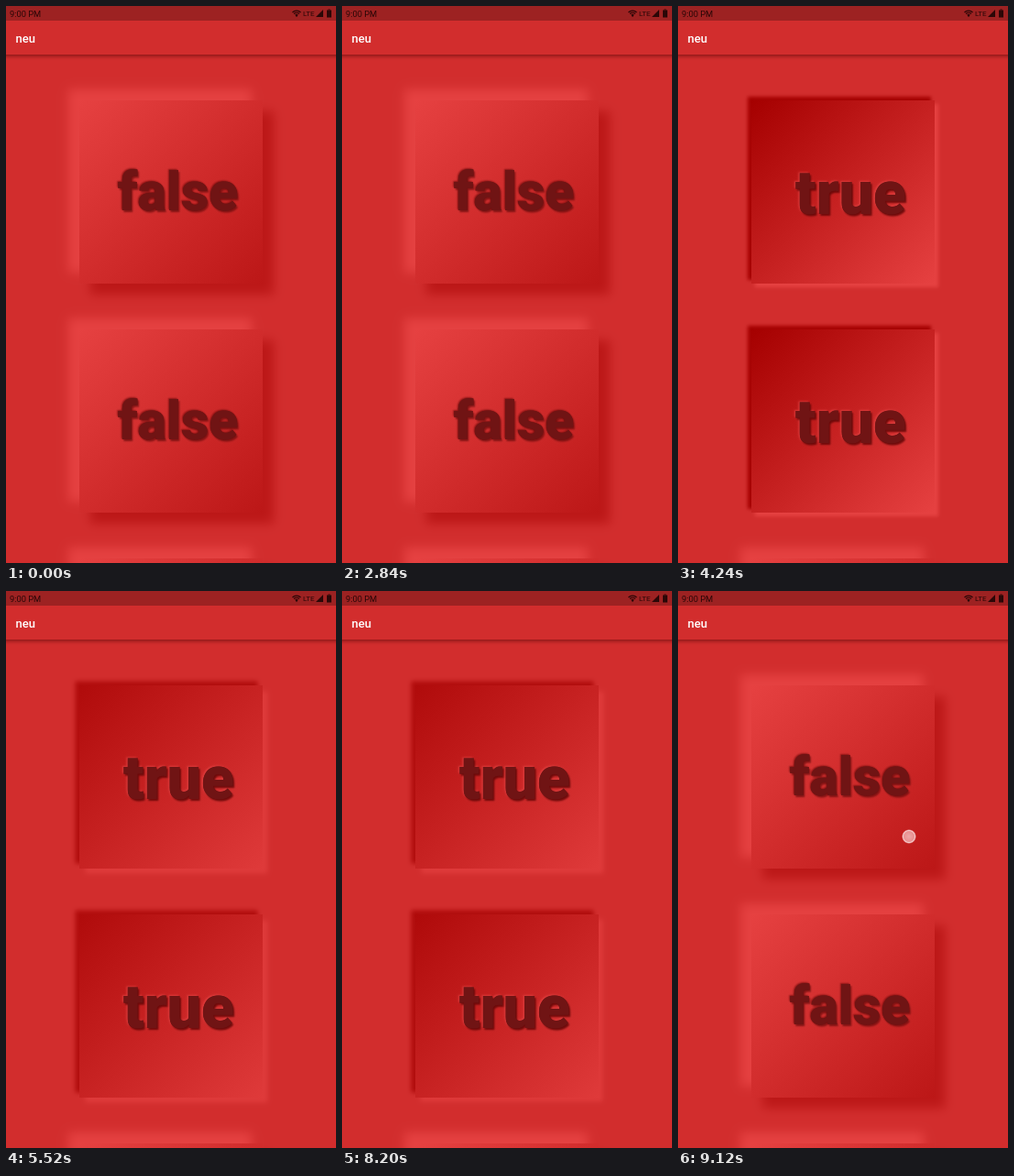
Write an HTML page with a canvas that moves like this. It is 360x608 px and loops after 9.16 s.

```html
<!DOCTYPE html>
<html lang="en">
<head>
<meta charset="utf-8">
<title>neu</title>
<style>
  html, body { margin: 0; width: 100%; height: 100%; overflow: hidden; background: #d22d2d; }
  canvas { display: block; width: 360px; height: 608px; }
</style>
</head>
<body>
<canvas id="stage" width="360" height="608"></canvas>
<script>
const ctx = document.getElementById('stage').getContext('2d');
const LOOP = 9160;
const SETTLE = 1000;
const BASE = [210, 45, 45];
const CARD = { x: 80, size: 200, tops: [103, 353, 603] };

// Moments at which each card flips, starting from "false".
const FLIPS = [
  [560, 1920, 4020, 8400],
  [4020, 6440, 7560, 8400],
  []
];

const TOUCHES = [
  { x: 245, y: 279, from: 80, to: 1920 },
  { x: 228.5, y: 425.5, from: 5960, to: 7560 },
  { x: 252, y: 268, from: 9080, to: LOOP }
];

const lerp = (a, b, t) => a + (b - a) * t;
const shade = d => `rgb(${BASE.map(c => Math.max(0, Math.min(255, Math.round(c + d)))).join()})`;

function elasticOut(t) {
  if (t <= 0) return 0;
  if (t >= 1) return 1;
  return 1 + 2 ** (-10 * t) * Math.sin((t - 0.1) * Math.PI * 5);
}

function cardState(flips, time) {
  const past = flips.filter(f => f <= time);
  const on = past.length % 2 === 1;
  if (!past.length) return { on, press: 0 };
  const e = elasticOut((time - past[past.length - 1]) / SETTLE);
  return { on, press: on ? e : 1 - e };
}

function setShadow(color, blur, offset) {
  ctx.shadowColor = color;
  ctx.shadowBlur = blur;
  ctx.shadowOffsetX = ctx.shadowOffsetY = offset;
}

function text(str, x, y, font, color) {
  ctx.font = font;
  ctx.fillStyle = color;
  ctx.fillText(str, x, y);
}

function drawLabel(on, top) {
  const [str, x, y, size] = on ? ['true', 128, 124, 66] : ['false', 122, 120, 59];
  const font = `900 ${size}px Roboto, sans-serif`;
  ctx.save();
  setShadow(on ? 'rgba(225,65,65,.75)' : 'rgba(120,12,12,.8)', 2, on ? -1.5 : -1);
  text(str, x, top + y, font, '#701414');
  setShadow(on ? 'rgba(95,5,5,.85)' : 'rgba(110,12,12,.8)', 2, 1.5);
  text(str, x, top + y, font, '#701414');
  ctx.restore();
}

function drawCard(top, { on, press }) {
  const { x, size } = CARD;
  const near = shade(lerp(20, -34, press));
  const far = shade(lerp(-22, 13, press));
  const offset = lerp(12, 5.5, press);
  const blur = Math.max(1, lerp(11, 5, press));

  ctx.save();
  ctx.fillStyle = shade(0);
  setShadow(near, blur, -offset);
  ctx.fillRect(x, top, size, size);
  setShadow(far, blur, offset);
  ctx.fillRect(x, top, size, size);
  ctx.restore();

  const g = ctx.createLinearGradient(x, top, x + size, top + size);
  g.addColorStop(0, near);
  g.addColorStop(1, far);
  ctx.fillStyle = g;
  ctx.fillRect(x, top, size, size);
  drawLabel(on, top);
}

function drawBars() {
  ctx.save();
  setShadow('rgba(70,0,0,.5)', 4, 0);
  ctx.shadowOffsetY = 1.5;
  ctx.fillStyle = shade(0);
  ctx.fillRect(-10, 0, 380, 53);
  ctx.restore();
  ctx.fillStyle = '#9d2222';
  ctx.fillRect(0, 0, 360, 16);

  const ink = '#2b0707';
  text('9:00 PM', 4, 11.5, '9.3px Roboto, sans-serif', ink);
  text('LTE', 324, 11.3, '8px Roboto, sans-serif', ink);
  text('neu', 10.5, 40, '500 13px Roboto, sans-serif', '#fff');

  // Wi-Fi, signal and battery
  ctx.strokeStyle = ctx.fillStyle = ink;
  ctx.lineWidth = 1.2;
  for (const r of [2, 4.2, 6.4]) {
    ctx.beginPath();
    ctx.arc(317, 11.5, r, -Math.PI * 0.75, -Math.PI * 0.25);
    ctx.stroke();
  }
  ctx.beginPath();
  ctx.arc(317, 10.8, 1, 0, Math.PI * 2);
  ctx.fill();
  ctx.beginPath();
  ctx.moveTo(338, 12);
  ctx.lineTo(346, 12);
  ctx.lineTo(346, 4);
  ctx.fill();
  ctx.fillRect(350, 4.5, 5, 8);
  ctx.fillRect(351.5, 3.5, 2, 1);
}

function drawTouch({ x, y, from, to }, time) {
  if (time < from || time >= to) return;
  ctx.save();
  ctx.globalAlpha = time < from + 40 ? 0.6 : 1;
  const g = ctx.createRadialGradient(x, y, 0, x, y, 8);
  g.addColorStop(0, 'rgba(255,225,225,.7)');
  g.addColorStop(0.68, 'rgba(255,215,215,.62)');
  g.addColorStop(0.82, 'rgba(255,235,235,.85)');
  g.addColorStop(1, 'rgba(255,225,225,0)');
  ctx.fillStyle = g;
  ctx.beginPath();
  ctx.arc(x, y, 8, 0, Math.PI * 2);
  ctx.fill();
  ctx.restore();
}

function draw(time) {
  ctx.fillStyle = shade(0);
  ctx.fillRect(0, 0, 360, 608);
  CARD.tops.forEach((top, i) => drawCard(top, cardState(FLIPS[i], time)));
  drawBars();
  TOUCHES.forEach(touch => drawTouch(touch, time));
}

const start = performance.now();
function tick() {
  draw((performance.now() - start) % LOOP);
  requestAnimationFrame(tick);
}
tick();
</script>
</body>
</html>
```
